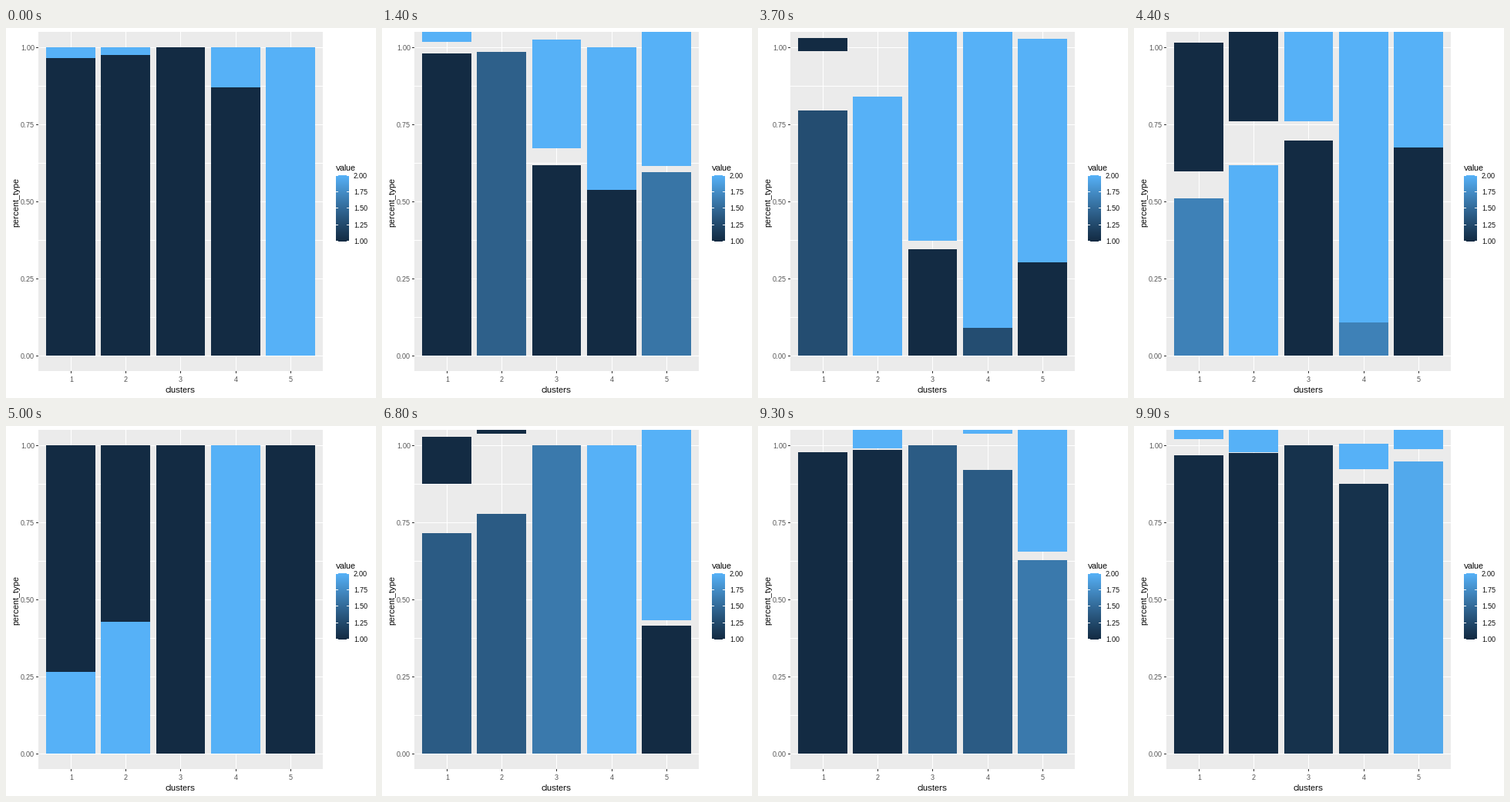
Animation, 480 px wide and 480 px high, one loop 10000 ms. Source, as a matplotlib script:

```python
import numpy as np
import matplotlib.pyplot as plt
from matplotlib.animation import FuncAnimation
from matplotlib.patches import Rectangle

plt.rcParams.update({"font.family": "Liberation Sans",
                     "text.hinting": "native", "text.hinting_factor": 1})

SIZE, DPI = 480, 80
FRAMES, STEP = 100, 25
CLUSTERS = 5
LEFT, RIGHT, TOP, BOTTOM = 42, 411, 5, 445
HALF_BAR = 31.92

# Per state: lower shares below 100 %, and the clusters whose lower row is light.
STATES = [
    ({0: 0.965, 1: 0.974, 3: 0.8689}, {4}),
    ({2: 0.0945, 3: 0.079, 4: 0.036}, {1}),
    ({0: 0.265, 1: 0.4275}, {0, 1, 3}),
    ({4: 0.043}, {2, 3}),
]

TO_XYZ = np.array([[0.4124564, 0.3575761, 0.1804375],
                   [0.2126729, 0.7151522, 0.0721750],
                   [0.0193339, 0.1191920, 0.9503041]])
WHITE = TO_XYZ.sum(axis=1)


def to_lab(rgb):
    c = np.array(rgb) / 255
    c = np.where(c > 0.04045, ((c + 0.055) / 1.055) ** 2.4, c / 12.92)
    q = TO_XYZ @ c / WHITE
    f = np.where(q > 0.008856, np.cbrt(q), 7.787 * q + 16 / 116)
    return np.array([116 * f[1] - 16, 500 * (f[0] - f[1]), 200 * (f[1] - f[2])])


def to_rgb(lab):
    fy = (lab[0] + 16) / 116
    f = np.array([fy + lab[1] / 500, fy, fy - lab[2] / 200])
    q = np.where(f > 0.206893, f ** 3, (f - 16 / 116) / 7.787)
    c = np.clip(np.linalg.solve(TO_XYZ, q * WHITE), 0, 1)
    c = np.where(c > 0.0031308, 1.055 * c ** (1 / 2.4) - 0.055, 12.92 * c)
    return np.clip(c, 0, 1)


LOW, HIGH = to_lab((19, 43, 67)), to_lab((86, 177, 247))


def shade(value):
    return to_rgb(LOW + (HIGH - LOW) * (value - 1))


def stacks(state):
    """Per cluster, rows of (ymin, ymax, value) from the bottom up."""
    shares, light = state
    out = []
    for c in range(CLUSTERS):
        share, value = shares.get(c, 1), 2 if c in light else 1
        rows = [np.array([0, share, value])]
        if share < 1:
            rows.append(np.array([share, 1, 3 - value]))
        out.append(rows)
    return out


STACKS = [stacks(s) for s in STATES]
# Upward drift: row heights, dealt out column by column over (y, ymin, ymax).
DRIFT = [row[1] - row[0] for s in (STACKS[3], STACKS[1])
         for rows in s for row in rows]


def drifted(here, there):
    """Off-stage places of the upper rows that exist only in one state."""
    lone = [c for c in range(CLUSTERS) if len(here[c]) > len(there[c])]
    n = len(lone)
    return {c: here[c][1] + [DRIFT[n + i], DRIFT[2 * n + i], 0]
            for i, c in enumerate(lone)}


def pose(frame):
    """Visible (cluster, ymin, ymax, value) bars at a frame."""
    k, p = divmod(frame, STEP)
    hold = 6 if k == 0 else 7
    t = max(0, p - hold) / (STEP - hold)
    a, b = STACKS[k], STACKS[(k + 1) % len(STACKS)]
    if t == 0:
        return [(c, *row) for c in range(CLUSTERS) for row in a[c]]
    leaving, entering = drifted(a, b), drifted(b, a)
    bars = []
    for c in range(CLUSTERS):
        for i in range(max(len(a[c]), len(b[c]))):
            start = a[c][i] if i < len(a[c]) else entering[c]
            end = b[c][i] if i < len(b[c]) else leaving[c]
            bars.append((c, *(start + (end - start) * t)))
    return bars


fig = plt.figure(figsize=(SIZE / DPI, SIZE / DPI), dpi=DPI, facecolor="white")
ax = fig.add_axes([0, 0, 1, 1])
ax.axis("off")


def box(x0, y0, x1, y1, color, z):
    patch = Rectangle((x0, y0), x1 - x0, y1 - y0, facecolor=color,
                      linewidth=0, antialiased=False, zorder=z)
    return ax.add_patch(patch)


def label(x, y, text, px=9, **style):
    ax.text(x, y, text, fontsize=px * 72 / DPI, **style)


def center(c):
    return 84.15 + 71.15 * c


def y_pixel(v):
    return max(TOP, min(BOTTOM, int(np.floor(425.5 - 400 * v))))


# Panel, grid and axes
box(LEFT, TOP, RIGHT, BOTTOM, "#EBEBEB", 0)
for i in range(9):
    y = 25 + 50 * i
    box(LEFT, y, RIGHT, y + 1, "white", 1)
    if i % 2 == 0:
        box(LEFT - 3, y, LEFT, y + 1, "#333333", 1)
        label(37, y + 4, f"{1 - i / 8:.2f}", color="#4D4D4D", ha="right")
for c in range(CLUSTERS):
    x = round(center(c))
    box(x, TOP, x + 1, BOTTOM, "white", 1)
    box(x, BOTTOM, x + 1, BOTTOM + 3, "#333333", 1)
    label(x + 0.5, 459, str(c + 1), color="#4D4D4D", ha="center")
label(226, 473, "clusters", 11, ha="center")
label(16, 226, "percent_type", 11, rotation=90, rotation_mode="anchor",
      ha="center", va="baseline")

# Colour bar
label(428, 185, "value", 11)
ramp = np.array([[shade(v)] for v in np.linspace(2, 1, 86)])
ax.imshow(ramp, extent=(428, 445, 277, 191), aspect="auto",
          interpolation="nearest", zorder=1)
for i in range(5):
    y = round(191 + 21.2 * i)
    box(428, y, 431, y + 1, "white", 2)
    box(442, y, 445, y + 1, "white", 2)
    label(451, y + 4, f"{2 - i / 4:.2f}")

bars = [box(0, 0, 0, 0, "white", 3 + i / 100) for i in range(2 * CLUSTERS)]
ax.set_xlim(0, SIZE)
ax.set_ylim(SIZE, 0)


def draw(frame):
    for bar in bars:
        bar.set_visible(False)
    for bar, (c, ymin, ymax, value) in zip(bars, pose(frame)):
        x0, x1 = round(center(c) - HALF_BAR), round(center(c) + HALF_BAR)
        y0, y1 = sorted((y_pixel(ymin), y_pixel(ymax)))
        bar.set_bounds(x0, y0, x1 - x0, y1 - y0)
        bar.set_facecolor(shade(value))
        bar.set_visible(y1 > y0)
    return bars


anim = FuncAnimation(fig, draw, frames=FRAMES, interval=100,
                     repeat=True, repeat_delay=0, blit=False)
plt.show()
```
